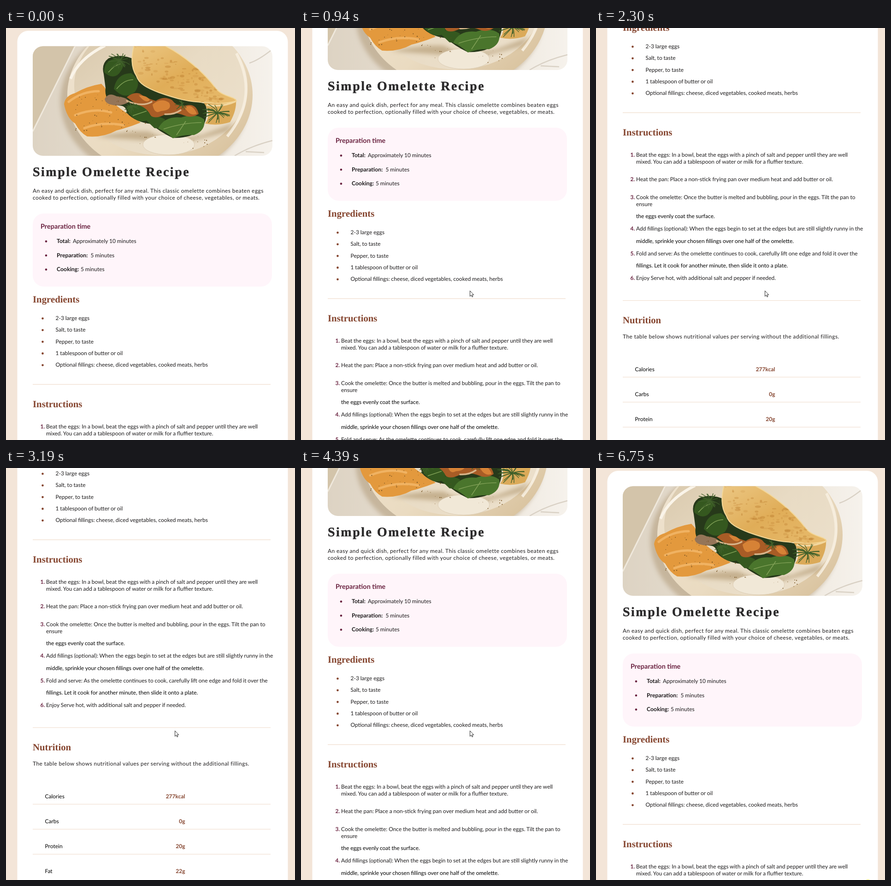
Recreate the animation shown at these times as an HTML page. Size 627x893 px, loop 6820 ms.

```html
<!DOCTYPE html>
<html lang="en">
<head>
<meta charset="utf-8">
<title>Simple Omelette Recipe</title>
<style>
html, body { margin: 0; width: 100%; height: 100%; overflow: hidden; background: #f3e5d8; }
svg { display: block; }
text { font: 12px Lato, "Open Sans", sans-serif; word-spacing: -.2px; fill: #1d1b1c; text-rendering: geometricPrecision; white-space: pre; }
.title { font: bold 28px "Liberation Serif", serif; letter-spacing: 2.5px; word-spacing: 0; fill: #2b2a2b; stroke: #2b2a2b; stroke-width: .5; }
.head { font: bold 20.8px "Liberation Serif", serif; fill: #85452f; }
.intro { letter-spacing: .45px; }
.bold { font-size: 12.3px; font-weight: 700; }
.prep { font-size: 14.5px; font-weight: 700; fill: #6a2340; }
.num { font-weight: 700; fill: #6a2340; }
.dark { fill: #000; }
.value { font-weight: 700; fill: #85452f; text-anchor: end; }
.rule { stroke: #f2e1d4; stroke-width: 1.3; }
</style>
</head>
<body>
<svg width="627" height="893" viewBox="0 0 627 893">
  <defs>
    <clipPath id="frame"><rect x="58" y="39.5" width="520" height="237.5" rx="22"/></clipPath>
    <clipPath id="fold"><path id="foldShape" d="M278 36Q318 28 346 39C386 60 428 94 456 132C472 150 496 148 500 158Q470 167 434 161C400 162 366 152 332 140C306 130 288 121 283 104C270 84 272 60 278 36Z"/></clipPath>
    <linearGradient id="marble">
      <stop offset="0" stop-color="#ddd3c3"/><stop offset=".5" stop-color="#e8e0d3"/><stop offset="1" stop-color="#f6f2ec"/>
    </linearGradient>
    <linearGradient id="plate" x1="0" y1="0" x2="1" y2="1">
      <stop offset="0" stop-color="#efe4d2"/><stop offset=".55" stop-color="#eadbc1"/><stop offset="1" stop-color="#d3ba92"/>
    </linearGradient>
    <linearGradient id="bowl" x1="0" y1="0" x2="1" y2="1">
      <stop offset="0" stop-color="#d6c5a8"/><stop offset=".5" stop-color="#e8dbc4"/><stop offset="1" stop-color="#ede1cd"/>
    </linearGradient>
    <linearGradient id="egg" x1="0" y1="0" x2="1" y2="1">
      <stop offset="0" stop-color="#ecc885"/><stop offset=".5" stop-color="#e0ad58"/><stop offset="1" stop-color="#e8bc6e"/>
    </linearGradient>
    <filter id="soft"><feGaussianBlur stdDeviation="5"/></filter>
  </defs>

  <g id="page">
    <rect x="24.5" y="6" width="587" height="1700" rx="24" fill="#fff"/>

    <g clip-path="url(#frame)">
      <rect x="58" y="39" width="520" height="239" fill="url(#marble)"/>
      <path d="M58 39H150L58 224Z" fill="#d3c4aa"/>
      <path d="M150 39L58 224" stroke="#efe8dc" stroke-width="3"/>
      <path d="M496 277Q530 256 578 244M528 76Q548 70 578 46M520 268L560 270" fill="none" stroke="#d9d1c5" stroke-width="2.5"/>
      <ellipse cx="322" cy="158" rx="204" ry="168" fill="#b09a78" opacity=".55" filter="url(#soft)"/>
      <ellipse cx="334" cy="145" rx="201" ry="170" fill="url(#plate)"/>
      <ellipse cx="336" cy="125" rx="188" ry="151" fill="url(#bowl)"/>
      <path d="M140 110Q158 66 215 38" fill="none" stroke="#faf4e9" stroke-width="6"/>
      <path d="M500 55Q550 150 480 235" fill="none" stroke="#f6eddd" stroke-width="6"/>
      <path d="M195 236Q260 222 310 224Q350 248 425 232L495 205 480 225 400 246 300 244Z" fill="#a3865a" opacity=".5" filter="url(#soft)"/>
      <ellipse cx="353" cy="253" rx="56" ry="22" fill="#f1e8d7" stroke="#dccdb4"/>

      <path d="M126 165Q128 147 150 141Q176 126 207 121Q222 135 226 155Q250 180 280 195L292 205Q265 216 240 222Q211 238 176 235Q160 226 150 207Q132 196 126 165Z" fill="#e3993d"/>
      <path d="M136 160Q165 137 201 137M150 189Q190 172 228 183M170 217Q210 202 256 211" fill="none" stroke="#f0b262" stroke-width="5" stroke-linecap="round"/>

      <path d="M212 100Q206 78 222 66Q246 55 274 66L284 104Q300 128 350 146L432 164Q442 190 424 220Q400 240 361 238Q332 224 315 208Q280 204 262 184Q262 168 244 168Q212 160 216 130Z" fill="#27391a"/>
      <g fill="#35581f">
        <path d="M213 96Q212 70 240 66Q262 74 250 92Q236 116 213 96Z"/>
        <path d="M234 132Q240 98 272 98Q296 116 280 138Q258 158 234 132Z"/>
        <path d="M262 170Q290 158 312 180Q318 204 290 202Q266 194 262 170Z"/>
        <path d="M300 196Q320 184 345 198Q340 220 322 217Z"/>
      </g>
      <path d="M330 218Q344 190 380 194Q412 184 430 198Q434 222 408 232Q386 230 362 239Q346 224 330 218Z" fill="#4a752c"/>
      <path d="M240 132Q256 112 276 112M222 96Q236 80 248 78M275 190L305 180M342 219Q385 205 424 205M370 232L390 202" fill="none" stroke="#7f9f55" stroke-width="1.6"/>

      <path d="M214 154Q222 138 240 148Q262 150 268 160Q246 172 228 166Q216 164 214 154Z" fill="#957558"/>
      <path d="M262 150Q276 138 290 142Q304 152 325 158Q342 146 360 156Q372 172 390 168Q412 162 418 186Q404 196 388 190Q366 180 344 188Q324 198 314 190Q306 172 284 166Z" fill="#a85c26"/>
      <path d="M318 166Q336 150 354 162Q362 178 336 180Q322 188 318 166ZM388 172Q404 162 414 186Q398 192 388 172ZM288 146Q306 146 312 156Q304 166 288 146Z" fill="#d68236"/>
      <path d="M262 158Q296 172 316 160M345 187Q365 188 379 178" fill="none" stroke="#d6b48a" stroke-width="3.5" stroke-linecap="round"/>
      <path d="M429 162Q469 161 499 154Q501 178 486 204Q459 213 432 207Q447 187 429 162Z" fill="#dbaa59"/>
      <path d="M435 167Q470 172 498 159" fill="none" stroke="#f2d79f" stroke-width="4"/>
      <use href="#foldShape" fill="url(#egg)" stroke="#f3d798" stroke-width="2"/>
      <g id="spots" clip-path="url(#fold)"></g>
      <g id="dill" fill="none" stroke="#40602a" stroke-width="1.3" stroke-linecap="round"></g>
      <g id="pepper" fill="#74501f"></g>
    </g>

    <text class="title" x="58" y="321">Simple Omelette Recipe</text>
    <text class="intro" x="58" y="356.5">An easy and quick dish, perfect for any meal. This classic omelette combines beaten eggs</text>
    <text class="intro" x="58" y="371.5">cooked to perfection, optionally filled with your choice of cheese, vegetables, or meats.</text>

    <rect x="58" y="402" width="519" height="158.5" rx="24" fill="#fff5fa"/>
    <text class="prep" x="75" y="435">Preparation time</text>
    <g fill="#6a2340"><circle cx="87" cy="462.5" r="2.3"/><circle cx="87" cy="493" r="2.3"/><circle cx="87" cy="523.5" r="2.3"/></g>
    <text class="bold" x="110" y="466">Total:</text><text x="145" y="466">Approximately 10 minutes</text>
    <text class="bold" x="110" y="496.5">Preparation:</text><text x="183.5" y="496.5">5 minutes</text>
    <text class="bold" x="110" y="527">Cooking:</text><text x="162" y="527">5 minutes</text>

    <text class="head" x="58" y="594.5">Ingredients</text>
    <g id="items"></g>
    <path class="rule" d="M58 772.5H574"/>

    <text class="head" x="58" y="822">Instructions</text>
    <text class="num" x="74.5" y="867.5">1.</text>
    <text x="87" y="867.5">Beat the eggs: In a bowl, beat the eggs with a pinch of salt and pepper until they are well</text>
    <text x="87" y="882.5">mixed. You can add a tablespoon of water or milk for a fluffier texture.</text>
    <text class="num" x="74.5" y="921">2.</text>
    <text x="87" y="921">Heat the pan: Place a non-stick frying pan over medium heat and add butter or oil.</text>
    <text class="num" x="74.5" y="959.5">3.</text>
    <text x="87" y="959.5">Cook the omelette: Once the butter is melted and bubbling, pour in the eggs. Tilt the pan to</text>
    <text x="87" y="974.5">ensure</text>
    <text class="dark" x="87" y="1001">the eggs evenly coat the surface.</text>
    <text class="num" x="74.5" y="1028">4.</text>
    <text x="87" y="1028">Add fillings (optional): When the eggs begin to set at the edges but are still slightly runny in the</text>
    <text class="dark" x="87" y="1055">middle, sprinkle your chosen fillings over one half of the omelette.</text>
    <text class="num" x="74.5" y="1081.5">5.</text>
    <text x="87" y="1081.5">Fold and serve: As the omelette continues to cook, carefully lift one edge and fold it over the</text>
    <text class="dark" x="87" y="1108">fillings. Let it cook for another minute, then slide it onto a plate.</text>
    <text class="num" x="74.5" y="1135">6.</text>
    <text x="87" y="1135">Enjoy Serve hot, with additional salt and pepper if needed.</text>
    <path class="rule" d="M58 1179.7H574"/>

    <text class="head" x="58" y="1228.5">Nutrition</text>
    <text class="intro" x="58" y="1262">The table below shows nutritional values per serving without the additional fillings.</text>
    <g id="table"></g>
  </g>

  <g id="cursor">
    <path id="arrow" d="M.6 .7V12.6L3.3 10 5.1 14 7 13.2 5.2 9.3H8.8Z" fill="#fff" stroke="#111" stroke-width=".9"/>
    <path id="beam" d="M0 -5.5H1.8M3.2 -5.5H5M2.5 -5V6.5M0 7H1.8M3.2 7H5" fill="none" stroke="#333"/>
  </g>
  <ellipse id="glow" cx="590" cy="895" rx="5" ry="4" fill="#fdfbae"/>
</svg>

<script>
const $ = id => document.getElementById(id);

const items = ["2-3 large eggs", "Salt, to taste", "Pepper, to taste", "1 tablespoon of butter or oil",
  "Optional fillings: cheese, diced vegetables, cooked meats, herbs"];
$("items").innerHTML = items.map((s, i) => {
  const y = 633 + i * 25.3;
  return `<circle cx="79.5" cy="${y - 3.5}" r="2.3" fill="#85452f"/><text x="107.5" y="${y}">${s}</text>`;
}).join("");

const rows = [["Calories", "277kcal"], ["Carbs", "0g"], ["Protein", "20g"], ["Fat", "22g"]];
$("table").innerHTML = rows.map(([name, value], i) => {
  const y = 1332.7 + i * 54.2;
  const rule = i < 3 ? `<path class="rule" d="M58 ${y + 13}H574"/>` : "";
  return `<text class="dark" x="84.5" y="${y}">${name}</text><text class="value" x="388.5" y="${y}">${value}</text>${rule}`;
}).join("");

let seed = 7;
const rand = (a, b) => {
  seed = (seed * 16807) % 2147483647;
  return a + (b - a) * seed / 2147483647;
};
const repeat = (n, make) => Array.from({ length: n }, make).join("");

$("spots").innerHTML = repeat(110, () => {
  const u = rand(0, 1);
  return `<ellipse cx="${285 + u * 190 + rand(-15, 15)}" cy="${65 + u * 88 + rand(-32, 30)}" rx="${rand(1, 7)}" ry="${rand(1, 3)}" fill="#bd7f31" opacity="${rand(.15, .5)}"/>`;
});
const speck = (x0, x1, y0, y1) => () =>
  `<circle cx="${rand(x0, x1)}" cy="${rand(y0, y1)}" r="${rand(.4, 1.2)}"/>`;
$("pepper").innerHTML = repeat(45, speck(150, 255, 145, 225)) + repeat(16, speck(250, 330, 205, 252))
  + repeat(12, speck(385, 445, 232, 262));
const sprig = (x, y, r, n) => repeat(n, () => {
  const a = rand(0, 6.28), d = rand(r / 2, r);
  return `<path d="M${x} ${y}q${d * .3} ${-d * .2} ${d * Math.cos(a)} ${d * .75 * Math.sin(a)}"/>`;
});
$("dill").innerHTML = sprig(455, 186, 32, 34) + sprig(243, 73, 27, 24) + sprig(380, 167, 16, 14) + sprig(270, 172, 20, 16);

const LOOP = 6820, TICK = 70;

// Eased progress in whole ticks: 0 before start, 1 after n ticks.
function progress(t, start, n, bend = 1) {
  const k = Math.min(n, Math.max(0, Math.floor((t - start) / TICK + 1.02)));
  const x = (k / n) ** bend;
  return x ** 3 * (10 - 15 * x + 6 * x * x);
}

// start, ticks, distance, bend
const scrolls = [[730, 8, 300, .825], [1810, 10, 303, .9], [2980, 4, 14, 1], [4110, 7, -584, 1.294], [4790, 3, -33, 1]];
// start, ticks, dx, dy, bend
const drags = [[100, 9, -209, -297, .8], [5520, 3, 28, 32, 1], [5860, 4, 138, 244, 1]];

function draw(now) {
  const t = now % LOOP;
  let top = 0, x = 575, y = 866;
  for (const [start, n, d, bend] of scrolls) top += d * progress(t, start, n, bend);
  for (const [start, n, dx, dy, bend] of drags) {
    const p = progress(t, start, n, bend);
    x += dx * p;
    y += dy * p;
  }
  const overText = t >= 1210 && t < 1880;
  const show = (id, on) => $(id).setAttribute("visibility", on ? "visible" : "hidden");
  $("page").setAttribute("transform", `translate(0 ${-Math.round(top)})`);
  $("cursor").setAttribute("transform", `translate(${Math.round(x)} ${Math.round(y)})`);
  const here = t >= 100 && t < 6145;
  show("arrow", here && !overText);
  show("beam", here && overText);
  show("glow", t >= 6750);
}

const begin = performance.now();
function loop() {
  draw(performance.now() - begin);
  requestAnimationFrame(loop);
}
loop();
</script>
</body>
</html>
```
